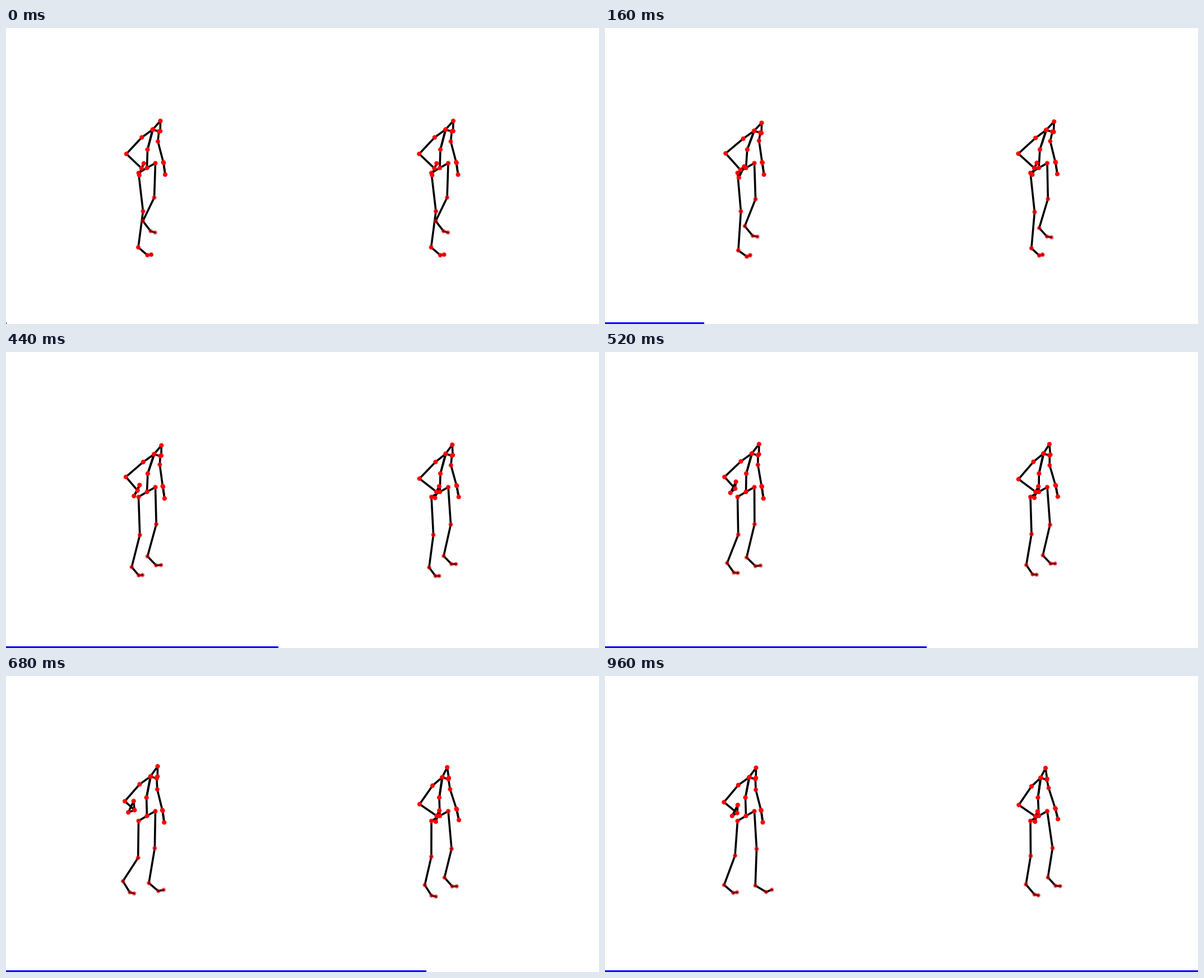
These frames come from a looping animation (1058x529 px, 1000 ms). A matplotlib script:

```python
import numpy as np
import matplotlib.pyplot as plt
from matplotlib.animation import FuncAnimation
from matplotlib.collections import LineCollection
from matplotlib.patches import Rectangle

W, H, DPI = 1058, 529, 100
FRAMES, STEP_MS = 25, 40
LAST = FRAMES - 1

# Points are complex numbers x + yj in pixels, y down.
# Joint: parent and offset from it in the first pose, shared by both walkers.
RIG = {
    "hip_l": ("pelvis", -15 + 9j),
    "hip_r": ("pelvis", 15 - 8.5j),
    "spine": ("pelvis", 1 - 32.8j),
    "thorax": ("pelvis", 10 - 68.3j),
    "neck": ("thorax", .8 - .5j),
    "head": ("thorax", 14 - 15.7j),
    "chin": ("head", -.3 + 18.2j),
    "collar": ("thorax", 11.3 + 3j),
    "shoulder_l": ("thorax", -19.2 + 13.8j),
    "elbow_l": ("pelvis", -36.7 - 25j),
    "wrist_l": ("pelvis", -9.7 + .8j),
    "thumb_l": ("wrist_l", 4 - 8.8j),
    "hand_l": ("wrist_l", -4 + 12.2j),
    "shoulder_r": ("thorax", 9.5 + 21j),
    "elbow_r": ("pelvis", 29.2 - 10j),
    "wrist_r": ("elbow_r", 3.3 + 22j),
    "hand_r": ("elbow_r", .6 + 1j),
    "knee_l": ("pelvis", -7 + 77.5j),
    "ankle_l": ("knee_l", -8.5 + 64.5j),
    "foot_l": ("ankle_l", 16.3 + 14j),
    "toe_l": ("foot_l", 6.8 - 1j),
    "knee_r": ("pelvis", 13 + 53j),
    "ankle_r": ("knee_r", -20.3 + 42j),
    "foot_r": ("ankle_r", 13.8 + 18j),
    "toe_r": ("foot_r", 8 + 2.5j),
}

# Joint: how far its offset drifts, arches out and back, and swings both ways.
STRIDE = {
    "spine": (-2, 1, 1.3),
    "thorax": (-4.5 - .5j, 3.6 + .8j, 3.7 + 2.3j),
    "head": (-1.5 - 1.5j, 0, 1.7j),
    "elbow_l": (-2.5 + .5j, -2j, 1),
    "wrist_l": (-6 - 6j, -5.4 - 2j, 4 + 5.5j),
    "thumb_l": (-3 - 5.5j, .5j, 3.7 + 4j),
    "hand_l": (-5 - 7j, -1, 3 + 3.3j),
    "shoulder_r": (2.5 + 1j, -2.3j, -1 - 3j),
    "elbow_r": (-2.5 - .5j, 0, 0),
    "knee_l": (-12.5 - 6.5j, 2.5j, 0),
    "ankle_l": (-11 - 12j, -3.2 - 4.5j, 8.5 + 11j),
    "foot_l": (0, -4 + 2j, 1 - 4.5j),
    "toe_l": (0, 1j, -1 - 2.3j),
    "knee_r": (6 + 6j, 1.8j, 3.5 + 1j),
    "ankle_r": (18 + 23.5j, -3.7 + 4.7j, 0),
    "foot_r": (5.5 - 6.5j, -1 + 1j, 0),
    "toe_r": (2 - 6.5j, 0, 0),
}
SHUFFLE = {
    "spine": (-2.6, 1, 1),
    "thorax": (-7 + .5j, 2.6, 3.2 + .8j),
    "head": (-5 - 2j, 0, 1.3 + 1j),
    "chin": (3 + 1j, 0, -1),
    "shoulder_l": (3 + 1.3j, 0, 0),
    "elbow_l": (1 + 5.5j, -1j, -1j),
    "wrist_l": (3.5, 2 - 1j, 0),
    "thumb_l": (0, 1 - 1j, 0),
    "hand_l": (3.5 - 2.7j, 0, 0),
    "shoulder_r": (5 - 3j, -1.5 + 1j, -2.5 - 1.5j),
    "elbow_r": (-3.7j, .5, 0),
    "wrist_r": (1.6 - 2.7j, 0, 0),
    "knee_l": (-7.5 - 6j, -1.5 + 1.6j, 1.7 + 1.7j),
    "ankle_l": (-13.5j, -1j, 3.3 + 3.6j),
    "foot_l": (-1 + 4j, -4.5, -2.1j),
    "toe_l": (2.5j, 0, -1 - 1j),
    "knee_r": (11.5 + 4.5j, 1 + 3.3j, 1),
    "ankle_r": (12 + 10.5j, 1.6 + 8.3j, 2.2 + 4.8j),
    "foot_r": (-3j, -2j, -1.5j),
    "toe_r": (-2j, -1.5j, 0),
}

CHAINS = [
    "pelvis spine thorax head chin",
    "spine neck",
    "thorax collar shoulder_r elbow_r wrist_r hand_r",
    "thorax shoulder_l elbow_l wrist_l thumb_l hand_l wrist_l",
    "pelvis hip_l knee_l ankle_l foot_l toe_l",
    "pelvis hip_r knee_r ankle_r foot_r toe_r",
]
BONES = [pair for c in CHAINS for pair in zip(c.split(), c.split()[1:])]
JOINTS = ["pelvis", *RIG]

# Opacity of joints far from the viewer; the left leg starts nearer.
FAR = {"hip": .85, "shoulder": .8, "knee": .62, "ankle": .46, "foot": .43, "toe": .42}
NEAR = .8


def pose(pelvis, motion, u):
    shape = np.array([u, np.sin(np.pi * u), np.sin(2 * np.pi * u)])
    pts = {"pelvis": pelvis}
    for name, (parent, offset) in RIG.items():
        pts[name] = pts[parent] + offset + shape @ motion.get(name, (0, 0, 0))
    return {name: (p.real, p.imag) for name, p in pts.items()}


def shade(name, u):
    part, _, side = name.partition("_")
    alpha = FAR.get(part, 1)
    if side == "l":
        if part == "shoulder":
            alpha = 1
        alpha += max(0, NEAR - alpha) * max(0, 1 - 2 * u)
    return 1, 0, 0, alpha


class Walker:
    def __init__(self, ax, pelvis, motion):
        self.pelvis, self.motion = pelvis, motion
        self.bones = LineCollection([], colors="black", linewidths=2.6,
                                    capstyle="projecting", zorder=2)
        ax.add_collection(self.bones)
        blank = np.zeros(len(JOINTS))
        self.dots = ax.scatter(blank, blank, s=19, linewidths=1.5, zorder=3)

    def update(self, u):
        pts = pose(self.pelvis, self.motion, u)
        colors = [shade(name, u) for name in JOINTS]
        self.bones.set_segments([(pts[a], pts[b]) for a, b in BONES])
        self.dots.set_offsets([pts[name] for name in JOINTS])
        self.dots.set_facecolors(colors)
        self.dots.set_edgecolors(colors)


fig = plt.figure(figsize=(W / DPI, H / DPI), dpi=DPI, facecolor="white")
ax = fig.add_axes([0, 0, 1, 1])
ax.axis("off")

walkers = [Walker(ax, 251.5 + 250j, STRIDE), Walker(ax, 774 + 250j, SHUFFLE)]
bar = ax.add_patch(Rectangle((0, H - 2.8), 1, 2.8, fc="blue", ec="none"))
ax.set_xlim(0, W)
ax.set_ylim(H, 0)


def draw(frame):
    u = frame / LAST
    for walker in walkers:
        walker.update(u)
    bar.set_width(1 + W * u)
    return []


anim = FuncAnimation(fig, draw, frames=FRAMES, interval=STEP_MS,
                     repeat=True, repeat_delay=0, blit=False)
plt.show()
```
